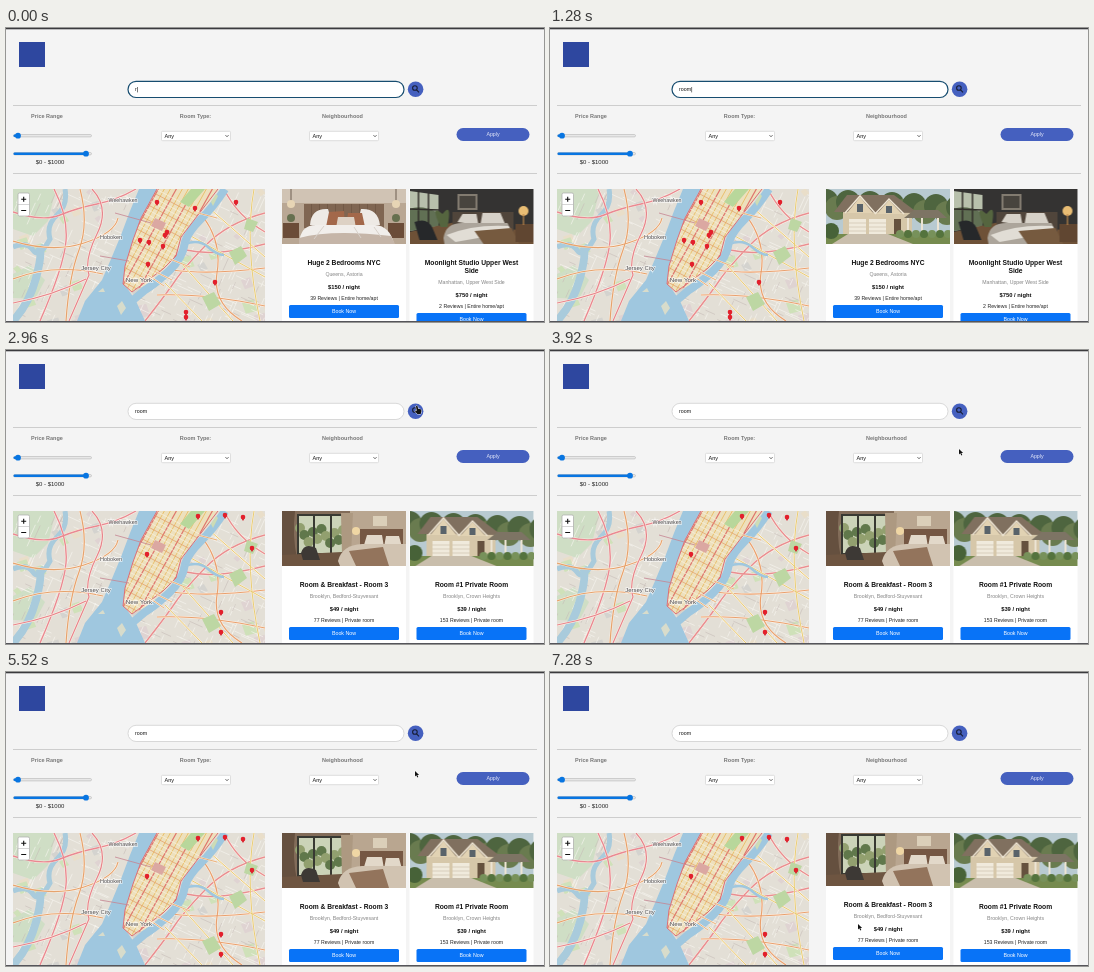
Write an HTML page with a canvas that moves like this. It is 538 by 294 pixels and loops after 7360 ms.

```html
<!DOCTYPE html>
<html lang="en">
<head>
<meta charset="utf-8">
<title>Room search</title>
<style>
  html, body { margin: 0; width: 100%; height: 100%; overflow: hidden; background: #f4f4f4; }
  canvas { display: block; width: 538px; height: 294px; }
</style>
</head>
<body>
<canvas id="stage" width="538" height="294"></canvas>
<script>
const W = 538, H = 294, LOOP = 7360, STEP = 80;
const FONT = '"Liberation Sans", Arial, sans-serif';
const BLUE = '#4560bf', ACTION = '#0873f7';
let ctx = document.getElementById('stage').getContext('2d');

const fill = (color, path) => { ctx.fillStyle = color; ctx.fill(new Path2D(path)); };
const stroke = (color, width, path) => {
  ctx.strokeStyle = color; ctx.lineWidth = width; ctx.stroke(new Path2D(path));
};
const rect = (color, x, y, w, h) => { ctx.fillStyle = color; ctx.fillRect(x, y, w, h); };
const disc = (color, x, y, r) => {
  ctx.fillStyle = color; ctx.beginPath(); ctx.arc(x, y, r, 0, 7); ctx.fill();
};
function round(x, y, w, h, r, color, border, line = 0.7) {
  ctx.beginPath(); ctx.roundRect(x, y, w, h, r);
  ctx.fillStyle = color; ctx.fill();
  if (border) { ctx.strokeStyle = border; ctx.lineWidth = line; ctx.stroke(); }
}
function text(str, x, y, size, color = '#111', weight = 400, align = 'center') {
  ctx.font = `${weight} ${size}px ${FONT}`;
  ctx.textAlign = align; ctx.textBaseline = 'middle';
  ctx.fillStyle = color; ctx.fillText(str, x, y);
}
function clipped(path, draw) {
  ctx.save(); ctx.clip(new Path2D(path)); draw(); ctx.restore();
}
function randomFrom(seed) {
  return () => (seed = (seed * 16807) % 2147483647) / 2147483647;
}
function prerender(draw) {
  const layer = document.createElement('canvas'), screen = ctx;
  layer.width = W; layer.height = H;
  ctx = layer.getContext('2d');
  draw();
  ctx = screen;
  return layer;
}

// Each photo fills a 124 x 55 box.
const photos = {
  linen() {
    rect('#b9a794', 0, 0, 124, 55);
    rect('#d0c3b4', 0, 0, 124, 14);
    rect('#806652', 22, 15, 80, 24);
    for (let x = 29; x < 100; x += 8) rect('#6c5343', x, 15, 0.7, 20);
    for (const x of [9, 114]) {
      rect('#544438', x - 0.4, 0, 0.8, 12);
      disc('#e7d5b5', x, 15, 4);
      rect('#6b4c38', x - 8, 34, 16, 15);
      disc('#66704f', x, 29, 4);
    }
    fill('#eeeae5', 'M28 36Q29 19 46 20L51 37ZM75 37L79 20Q96 19 98 36Z');
    fill('#a3684a', 'M44 38L47 23L62 22L63 38ZM64 38L66 24L80 24L83 38Z');
    fill('#ddd1c4', 'M54 39L56 28H72L74 39Z');
    fill('#f1eeeb', 'M17 55Q18 36 34 36H93Q108 37 112 55Z');
    fill('#c5b5a8', 'M17 49Q50 40 109 47L113 55H17Z');
    stroke('#d8d1ca', 1, 'M42 37L32 50M72 38L79 49M92 38L99 48');
  },
  charcoal() {
    rect('#343332', 0, 0, 124, 55);
    fill('#b8c0ac', 'M0 2L29 6V37L0 42Z');
    fill('#617054', 'M0 20Q12 15 29 24V37L0 42Z');
    stroke('#302d29', 1.5, 'M9 2V41M19 4V39M0 20L29 21');
    rect('#827b70', 48, 5, 20, 16);
    rect('#48443e', 50, 7, 16, 12);
    fill('#6e5137', 'M0 43L46 33L124 43V55H0Z');
    fill('#50453b', 'M43 23H104V44H43Z');
    fill('#d6d1c8', 'M48 33L53 25H67L69 36ZM71 35L73 24H91L96 36Z');
    fill('#aca59b', 'M34 49Q36 34 53 34H98L108 55H35Z');
    fill('#e1ddd5', 'M37 46Q64 35 99 37L103 43L46 53Z');
    fill('#765a3f', 'M65 42L102 39L110 55H74Z');
    fill('#26282a', 'M5 33Q18 28 23 39L28 51H10Z');
    rect('#604631', 106, 35, 18, 18);
    disc('#e9bd74', 114, 22, 5);
    rect('#bb864b', 113.4, 25, 1.2, 11);
    fill('#55653f', 'M31 38Q20 14 33 25Q43 12 38 38Z');
  },
  timber() {
    rect('#d9d9d8', 0, 0, 124, 55);
    fill('#aeb6b8', 'M0 22L19 12L39 24L74 15L124 29V55H0Z');
    for (let i = 0; i < 10; i++) {
      const x = i < 5 ? i * 6 : 88 + (i - 5) * 8, y = i < 5 ? 3 + i * 3 : 20 - (i % 3) * 6;
      fill('#414b40', `M${x} ${y}L${x + 7} 48H${x - 7}Z`);
    }
    fill('#594235', 'M24 13L99 8L106 12L31 18Z');
    rect('#92623f', 34, 16, 64, 31);
    fill('#3e332d', 'M23 29L111 25V30L23 33Z');
    for (const y of [17, 33]) for (let x = 37; x < 94; x += 12) {
      rect('#d7ad72', x, y, 10, 10);
      rect('#66747a', x + 1, y + 1, 4, 8);
    }
    stroke('#493629', 1.5, 'M31 17V48M99 11V48M66 15V48');
    fill('#75624f', 'M0 47L124 43V55H0Z');
    fill('#aea28e', 'M44 47L88 46L113 55H26Z');
    rect('#363a30', 0, 46, 26, 9);
  },
  gables() {
    rect('#b8cad1', 0, 0, 124, 55);
    for (let i = 0; i < 13; i++) disc(i % 2 ? '#697b4f' : '#4e653f', i * 11, 12 + (i * 7) % 13, 12);
    rect('#d6c7a9', 17, 20, 69, 26);
    fill('#80705f', 'M8 23L21 6H68L92 24Z');
    fill('#e1d2b3', 'M21 24L34 8L47 24ZM51 25L63 11L76 25Z');
    stroke('#eee5d3', 1.5, 'M19 24L34 7L49 24M49 25L63 10L78 25');
    rect('#59636a', 31, 15, 6, 8);
    rect('#59636a', 60, 17, 6, 7);
    for (const x of [23, 43]) {
      rect('#f0eadc', x, 30, 17, 15);
      stroke('#c6bba6', 0.6, `M${x} 34h17M${x} 38h17M${x} 42h17`);
    }
    rect('#65513e', 68, 30, 7, 15);
    fill('#7d7464', 'M78 29L88 21H112L121 29Z');
    stroke('#ece4d4', 2, 'M82 29V46M96 29V46M112 29V46');
    fill('#768b4f', 'M0 45H124V55H0Z');
    fill('#c9beac', 'M22 45H62L87 55H6Z');
    for (let i = 0; i < 7; i++) disc(i % 2 ? '#54733d' : '#77915a', 74 + i * 8, 45, 4);
    disc('#476238', 5, 42, 8);
  },
  garden() {
    rect('#826c59', 0, 0, 124, 55);
    rect('#b9a690', 68, 0, 56, 42);
    rect('#cbd3b8', 16, 5, 48, 38);
    for (let i = 0; i < 11; i++) disc(i % 2 ? '#60784b' : '#92a06f', 18 + i * 4.3, 17 + (i * 7) % 17, 5);
    stroke('#383932', 2, 'M16 4H64V43H16ZM32 4V43M49 4V43');
    fill('#65503f', 'M0 0H13Q10 25 15 47H0Z');
    fill('#ad9981', 'M59 2H71L69 44H60Z');
    fill('#6e5541', 'M0 44L60 41L124 48V55H0Z');
    rect('#755743', 78, 18, 43, 24);
    fill('#e2d8c9', 'M82 34L85 24H100L102 36ZM102 36L104 25H117L120 36Z');
    fill('#d1c3b1', 'M56 50Q60 34 80 33H124V55H58Z');
    fill('#93745c', 'M67 40L101 36L107 55H74Z');
    fill('#3d3935', 'M19 42Q22 31 34 37L38 49H21Z');
    disc('#efd6a4', 74, 20, 4);
    rect('#dbcfb9', 91, 5, 14, 10);
  }
};

const MAP = 'M7 161H259V293H7Z';
const MANHATTAN = 'M151 161L135 190L127 212L119 238L117 256L126 264L139 257L157 241L170 228L175 209L188 191L203 174L212 161Z';

function drawMap() {
  const rnd = randomFrom(73);
  const road = (color, width, path) => {
    stroke('#fff3e8', width + 0.8, path);
    stroke(color, width, path);
  };
  rect('#e3dfd6', 7, 161, 252, 132);
  fill('#cfdec5', 'M7 161H50L42 193L27 208L7 201ZM7 246L24 237L39 252L29 271L7 270Z');
  for (let i = 0; i < 44; i++) {
    const x = 7 + rnd() * 252, y = 161 + rnd() * 132, s = 3 + rnd() * 9;
    fill(['#cfe1b9', '#dfd3d2', '#e9dec9', '#d4d3cf'][i % 4], `M${x} ${y}l${s} -3l4 ${s}l${-s} 3Z`);
  }
  for (let i = 0; i < 300; i++) {
    const x = 7 + rnd() * 252, y = 161 + rnd() * 132, l = 5 + rnd() * 12, turn = i % 2;
    stroke(i % 5 ? '#f8f6f2' : '#c7bcb8', 0.6, `M${x} ${y}l${turn ? l : -l * 0.45} ${turn ? l * 0.45 : l}`);
  }
  stroke('#a9cbdc', 5, 'M7 219Q21 213 27 222T44 211Q40 197 51 187T59 161');
  stroke('#a9cbdc', 8, 'M7 293Q23 276 30 250T33 218');

  road('#e98992', 1.4, 'M7 184Q37 194 54 187T91 176T130 161M48 161Q62 188 60 213T34 293');
  road('#e6a36d', 1.2, 'M7 213Q47 225 78 215T112 190M74 161Q83 195 73 222T60 293M7 251Q48 235 97 246');
  road('#e7848c', 1.2, 'M86 161Q104 180 91 206T83 247L63 293M7 275Q46 268 80 251');
  road('#e98e91', 1.4, 'M259 185Q221 195 199 218T169 253T139 293M218 161Q231 188 259 204M180 222Q210 229 259 216');
  road('#e9a16f', 1.2, 'M198 190Q216 215 211 245T236 293M166 242Q204 247 259 240M151 267Q198 265 259 278');
  road('#e5c967', 0.9, 'M183 207L259 249M203 180L259 229M177 237L227 293M248 161Q238 216 254 293M159 255L196 293');
  fill('#bdd7a3', 'M223 224L235 218L241 228L229 237ZM196 269L208 264L215 276L203 283ZM241 190L252 194L247 204L238 201Z');

  const river = '#9fc7df';
  fill(river, 'M133 161L124 183L115 207L105 231L96 252L79 273L71 293H139L130 273L119 257L121 238L130 210L137 190L153 161Z');
  stroke(river, 8, 'M219 161Q208 178 195 191T179 214Q177 230 163 243T139 262L126 273');
  stroke(river, 2.5, 'M179 216Q193 211 202 219T218 227');
  fill('#d8dccb', 'M111 278L116 273L120 280L115 287ZM92 264L97 260L99 264Z');
  fill('#cddcb5', 'M205 174L210 166L212 168L207 178Z');

  fill('#ede0bd', MANHATTAN);
  clipped(MANHATTAN, () => {
    for (let i = 0; i < 18; i++) {
      const x = 92 + i * 6;
      stroke(i % 3 ? '#e9bd65' : '#df756d', i % 3 ? 0.9 : 1.2, `M${x} 270L${x + 62} 158`);
    }
    for (let y = 160; y < 290; y += 5) {
      stroke(y % 3 ? '#f9f1dc' : '#e39b65', 0.7, `M110 ${y - 20}L220 ${y + 38}`);
    }
    fill('#b8d79b', 'M174 174L183 179L199 161H185Z');
    fill('#dba8a2', 'M149 190L160 195L156 203L145 198Z');
  });
  stroke('#dc6e77', 1, 'M151 161L135 190L127 212L119 238L117 256L126 264L157 241L170 228L175 209L212 161');
  road('#e3a05f', 0.8, 'M142 247L158 258M148 243L166 252M164 231L184 239M192 185L211 190');
  stroke('#c68492', 0.8, 'M94 228L123 233M109 185L145 195');

  const label = (name, x, y, size) => {
    ctx.font = `${size}px ${FONT}`;
    ctx.textAlign = 'center'; ctx.textBaseline = 'middle';
    ctx.strokeStyle = '#ffffffb8'; ctx.lineWidth = 1.6; ctx.strokeText(name, x, y);
    text(name, x, y, size, '#4a4747');
  };
  label('Weehawken', 117, 172.5, 5.3);
  label('Hoboken', 105, 209, 5.5);
  label('Jersey City', 90, 240.5, 6);
  label('New York', 133, 252.5, 6.2);
}

function drawZoom() {
  round(12, 165, 11.5, 23, 1.5, '#fff', '#aaa');
  stroke('#bbb', 0.6, 'M12 176.5h11.5');
  stroke('#111', 1.1, 'M15.2 171.2h5M17.7 168.7v5M15.2 182.5h5');
}

function drawPage() {
  rect('#f4f4f4', 0, 0, W, H);
  rect('#3b3b3e', 0, 0, W, 1.3);
  rect('#2e479f', 13, 14, 26, 25);
  for (const y of [77, 145]) rect('#c9c9c9', 7, y, 524, 0.9);

  text('Price Range', 41, 88.5, 5.5, '#777', 700);
  text('Room Type:', 189.5, 88.5, 5.5, '#777', 700);
  text('Neighbourhood', 336.5, 88.5, 5.5, '#777', 700);
  for (const [y, x] of [[107.7, 12], [125.7, 80]]) {
    round(7.5, y - 1.2, 78, 2.4, 1.2, '#e7e7e7', '#aaa', 0.5);
    round(7.5, y - 1.2, x - 7.5, 2.4, 1.2, '#0875e1');
    disc('#0875e1', x, y, 2.9);
  }
  text('$0 - $1000', 44, 134.5, 6, '#222');
  for (const x of [155.5, 303.5]) {
    round(x, 103.3, 69, 9.4, 1, '#fff', '#d1d1d1');
    text('Any', x + 3, 108.2, 5.5, '#111', 400, 'left');
    stroke('#333', 0.8, `M${x + 64} 107.2l1.5 1.5l1.5 -1.5`);
  }
  round(450.5, 100, 73, 13, 6.5, BLUE);
  text('Apply', 487, 106.7, 5.3, '#e4e8fa');
}

const before = {
  cards: [
    { title: ['Huge 2 Bedrooms NYC'], place: 'Queens, Astoria', price: 150, note: '39 Reviews | Entire home/apt' },
    { title: ['Moonlight Studio Upper West', 'Side'], place: 'Manhattan, Upper West Side', price: 750, note: '2 Reviews | Entire home/apt' }
  ],
  pins: [[151, 174], [189, 180], [230, 174], [161, 204], [159, 207], [134, 212], [143, 214],
    [157, 218], [142, 236], [209, 254], [180, 284], [180, 289]]
};
const after = {
  cards: [
    { title: ['Room & Breakfast - Room 3'], place: 'Brooklyn, Bedford-Stuyvesant', price: 49, note: '77 Reviews | Private room' },
    { title: ['Room #1 Private Room'], place: 'Brooklyn, Crown Heights', price: 39, note: '153 Reviews | Private room' }
  ],
  pins: [[192, 166], [219, 165], [237, 167], [246, 198], [141, 204], [215, 262], [215, 282]]
};
const states = [
  { at: 0, query: 'r', photos: ['linen', 'charcoal'], data: before },
  { at: 320, query: 'ro', photos: ['gables', 'timber'], data: before },
  { at: 560, query: 'roo', photos: ['timber', 'linen'], data: before },
  { at: 880, query: 'room', photos: ['gables', 'charcoal'], data: before },
  { at: 2480, query: 'room', photos: ['garden', 'gables'], data: after }
];
const BLUR_AT = 2320, POINTER_AT = 1680;
const pointerKeys = [[1680, 414, 67], [1840, 410, 56], [3280, 410, 56], [3680, 409, 99],
  [6720, 409, 99], [7200, 308, 252]];

const ease = p => p * p * (3 - 2 * p);
const progress = (t, from, to) => Math.min(1, Math.max(0, (t - from) / (to - from)));

function pointerAt(t) {
  const i = Math.max(0, pointerKeys.findLastIndex(k => k[0] <= t));
  const [t0, x0, y0] = pointerKeys[i], [t1, x1, y1] = pointerKeys[i + 1] || [t0 + 1, x0, y0];
  const p = ease(progress(t, t0, t1));
  return [x0 + (x1 - x0) * p, y0 + (y1 - y0) * p];
}

function drawSearch(t, state) {
  const focused = t < BLUR_AT;
  round(122, 53.3, 276, 16.2, 8.1, '#fff', focused ? '#174d70' : '#d0d0d0', focused ? 1.2 : 0.8);
  text(state.query, 129, 61.7, 5.3, '#111', 400, 'left');
  if (focused && (t - state.at) % 1060 < 530) {
    rect('#222', 129.4 + ctx.measureText(state.query).width, 59, 0.6, 5.4);
  }
  disc(BLUE, 409.6, 61.3, 7.8);
  stroke('#171d35', 1.1, 'M411.2 60a2.3 2.3 0 1 1 -4.6 0a2.3 2.3 0 1 1 4.6 0M410.6 61.8L413 64.3');
}

function drawCard(card, photo, x, lift) {
  ctx.save();
  ctx.translate(x, -lift);
  rect('#fff', 0, 161, 124, 140);
  ctx.drawImage(photoLayers[photo], 0, 0, 124, 55, 0, 161, 124, 55);
  card.title.forEach((line, i) => text(line, 62, 235 + i * 8, 6.7, '#111', 700));
  const y = (card.title.length - 1) * 8;
  text(card.place, 62, 247 + y, 5.2, '#858585');
  text(`$${card.price} / night`, 62, 259 + y, 5.8, '#111', 700);
  text(card.note, 62, 270.5 + y, 5.2, '#222');
  round(7, 277 + y, 110, 13, 1.5, ACTION);
  text('Book Now', 62, 283.7 + y, 5.3, '#fff');
  ctx.restore();
}

function drawPointer(t) {
  if (t < POINTER_AT) return;
  const [x, y] = pointerAt(t);
  const overButton = Math.hypot(x - 409.6, y - 61.3) < 7.8;
  const shape = overButton
    ? 'M0 0q1 -1 1.6 .4l.5 2.4l2.5 .5q1.2 .6 .8 2l-.7 2.7h-3.4l-2.4 -3q.1 -1 1.8 .1Z'
    : 'M0 0v5.5l1.3 -1.2l1 2.2l1 -.5l-1 -2.1h1.8Z';
  ctx.save();
  ctx.translate(x, y);
  stroke('#fff', 1, shape);
  fill('#111', shape);
  ctx.restore();
}

const photoLayers = Object.fromEntries(Object.entries(photos).map(([name, draw]) => [name, prerender(draw)]));
const page = prerender(() => {
  drawPage();
  clipped(MAP, drawMap);
});

function render(now) {
  const t = Math.floor(now % LOOP / STEP) * STEP;
  const state = states.findLast(s => s.at <= t);
  ctx.drawImage(page, 0, 0);
  drawSearch(t, state);
  clipped(MAP, () => {
    for (const [x, y] of state.data.pins) {
      fill('#d61f2c', `M${x - 1.8} ${y + 1}L${x} ${y + 4}L${x + 1.8} ${y + 1}Z`);
      disc('#e3202c', x, y, 2.3);
    }
    drawZoom();
  });
  clipped('M270 161H534V293H270Z', () => {
    const lift = 2 * progress(t, 7120, 7280);
    drawCard(state.data.cards[0], state.photos[0], 276, lift);
    drawCard(state.data.cards[1], state.photos[1], 403.5, 0);
  });
  rect('#55555a', 0, 293, W, 1);
  drawPointer(t);
}

const start = performance.now();
function frame() {
  render(performance.now() - start);
  requestAnimationFrame(frame);
}
frame();
</script>
</body>
</html>
```
